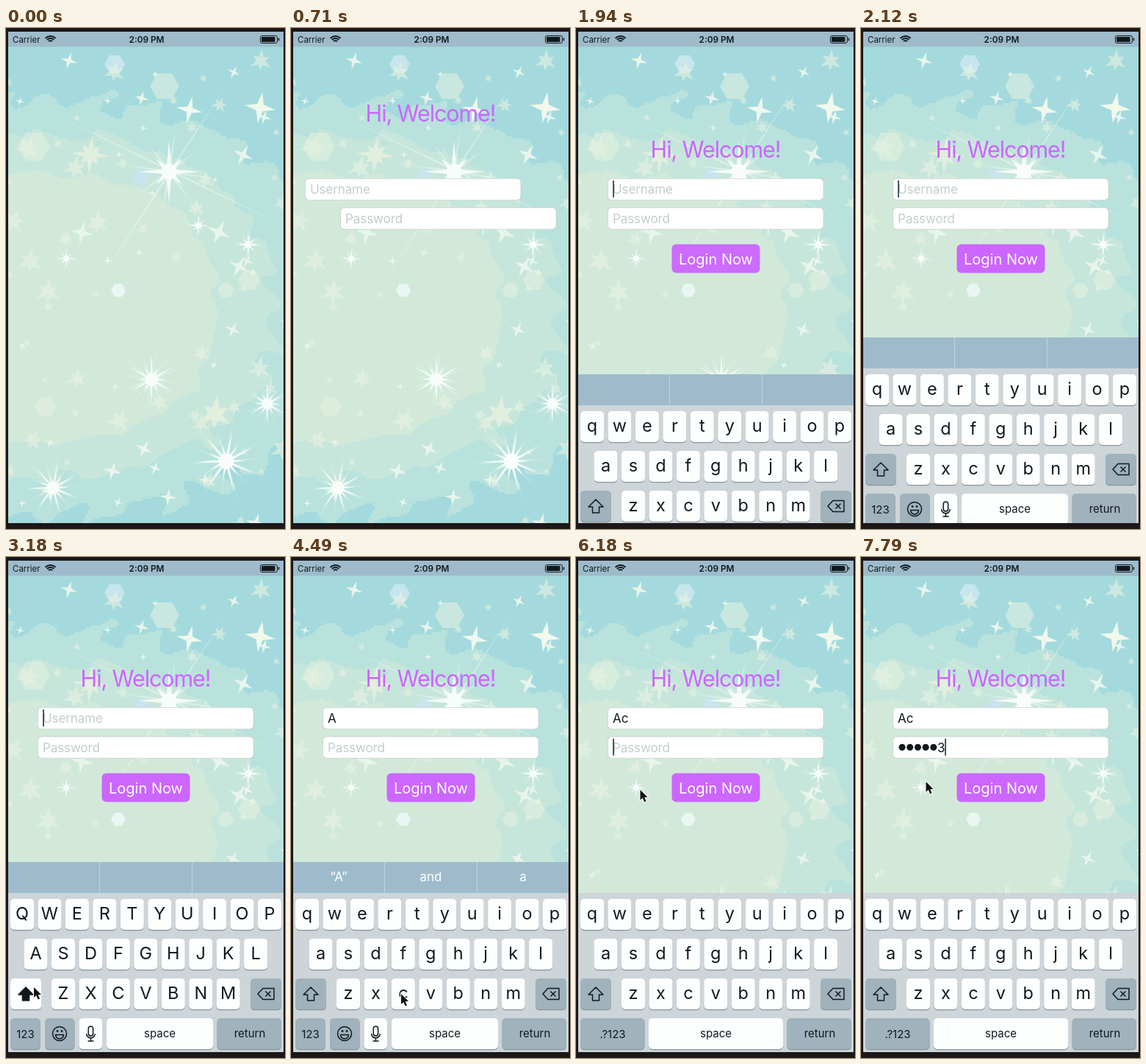
An HTML page with a canvas for the animation above (8 s loop, 380 by 680 pixels).

```html
<!DOCTYPE html>
<html lang="en">
<head>
<meta charset="utf-8">
<title>Login screen</title>
<style>
html, body { margin: 0; width: 100%; height: 100%; overflow: hidden; background: #1c1718; }
canvas { display: block; }
</style>
</head>
<body>
<canvas id="stage" width="380" height="680"></canvas>
<script>
const LOOP = 8000, PURPLE = '#cc66ff', INK = '#10191e', BAR = '#9fbbcb', WHITE = '#fdfefe', GREY = '#a0b2bb';
let c = document.getElementById('stage').getContext('2d');

const clamp = v => Math.min(1, Math.max(0, v));
const ease = v => { v = clamp(v); return v * v * (3 - 2 * v); };
const between = (t, a, b) => t >= a && t < b;

let seed = 7;
const random = () => (seed = seed * 16807 % 2147483647) / 2147483647;

function rect(x, y, w, h, color) {
  c.fillStyle = color;
  c.fillRect(x, y, w, h);
}
function box(x, y, w, h, r, color) {
  c.fillStyle = color;
  c.beginPath();
  c.roundRect(x, y, w, h, r);
  c.fill();
}
const dot = (x, y, r, color) => box(x - r, y - r, 2 * r, 2 * r, r, color);

function text(s, x, y, size, color, { align = 'left', weight = 400, spacing = 0 } = {}) {
  c.font = `${weight} ${size}px Inter, "Open Sans", sans-serif`;
  c.letterSpacing = spacing + 'px';
  c.textAlign = align;
  c.fillStyle = color;
  c.fillText(s, x, y);
  return c.measureText(s).width;
}
function path(points, close) {
  c.beginPath();
  points.forEach(([x, y]) => c.lineTo(x, y));
  if (close) c.closePath();
}
function shape(points, color) {
  c.fillStyle = color;
  path(points, true);
  c.fill();
}
function layer(width, height, paint) {
  const canvas = Object.assign(document.createElement('canvas'), { width, height });
  const outer = c;
  c = canvas.getContext('2d');
  paint();
  c = outer;
  return canvas;
}

// ---------- sparkling backdrop, painted once ----------
function spikes(x, y, r, n, inner, color, turn = 0, minor = 1) {
  shape(Array.from({ length: 2 * n }, (_, k) => {
    const angle = turn + (k / n - 0.5) * Math.PI;
    const len = k % 2 ? r * inner : k % 4 ? r * minor : r;
    return [x + len * Math.cos(angle), y + len * Math.sin(angle)];
  }), color);
}
function hexagon(x, y, r, color) {
  spikes(x, y, r, 3, 1, color, Math.PI / 6);
}

// Stepped colour bands around a rounded pale area at the left.
function paintBands() {
  const size = 3;
  for (let y = 0; y < 680; y += size)
    for (let x = 0; x < 380; x += size) {
      const d = ((x / 283) ** 2.6 + Math.abs((y - 378) / 183) ** 2.6) ** (1 / 2.6);
      const wave = Math.sin(x / 12 + 2 * Math.sin(y / 15)) + Math.sin(y / 9 + 2 * Math.sin(x / 17));
      const level = d + 0.07 * wave * clamp(d - 0.8);
      rect(x, y, size, size,
        level < 1 ? '#d2e9da' : level < 1.27 ? '#c7e6db' : level < 1.53 ? '#b9e2dd' : '#a4dadd');
    }
}
function paintSmallStars() {
  for (let row = 0; row < 13; row++)
    for (let col = 0; col < 7; col++) {
      const x = 3 + (col + random()) * 54, y = 28 + (row + random()) * 50;
      const r = 5 + 12 * random() ** 2, soft = random() < 0.6, turn = random() * 0.5;
      if (Math.hypot(x - 210, y - 395) < 70) continue;
      if (soft) spikes(x, y, r * 1.2, 6, 0.4, 'rgba(232,242,225,.6)', turn, 0.8);
      else spikes(x, y, r, 4, 0.28, '#e8f5ec', turn);
    }
}
function ray(x1, y1, x2, y2) {
  const nx = (y2 - y1) * 0.004, ny = (x1 - x2) * 0.004;
  const mx = (x1 + x2) / 2, my = (y1 + y2) / 2;
  shape([[x1, y1], [mx + nx, my + ny], [x2, y2], [mx - nx, my - ny]], 'rgba(240,250,244,.5)');
}
function paintBackdrop() {
  paintBands();
  [[38, 161, 22], [331, 342, 15], [54, 514, 15], [299, 356, 11], [216, 79, 20]]
    .forEach(([x, y, r]) => hexagon(x, y, r, 'rgba(226,240,224,.6)'));
  hexagon(148, 49, 14, '#c6e5ed');
  hexagon(183, 202, 12, '#c9e4ec');
  hexagon(153, 356, 10, '#eaf6f4');
  paintSmallStars();
  spikes(115, 172, 26, 8, 0.35, 'rgba(230,241,223,.85)', 0.1, 0.65);
  spikes(285, 524, 24, 6, 0.4, 'rgba(230,241,223,.85)', 0.1, 0.8);
  spikes(346, 108, 21, 4, 0.3, '#f1f8ec', 0.15);
  spikes(250, 111, 18, 4, 0.28, '#eff8ee', 0.2);
  ray(75, 122, 374, 266);
  ray(302, 75, 128, 342);

  [[222, 195, 42, 8], [198, 477, 34, 12], [300, 588, 42, 14], [356, 510, 28, 12],
    [64, 624, 34, 14], [82, 313, 14, 8], [330, 294, 18, 8], [262, 268, 15, 8]]
    .forEach(([x, y, r, n]) => {
      spikes(x, y, r * 1.4, n, 0.1, 'rgba(240,250,246,.4)', 0.15, 0.8);
      spikes(x, y, r, n, 0.2, '#f3fbf7', n % 4 * 0.1, 0.6);
      dot(x, y, r * 0.25, '#f8fdfb');
    });
}
const backdrop = layer(380, 680, paintBackdrop);

// ---------- form ----------
function statusBar() {
  rect(3, 5, 375, 20.5, BAR);
  text('Carrier', 9, 19.5, 11.5, INK);
  text('2:09 PM', 191.5, 19.5, 11.8, INK, { align: 'center', weight: 600 });
  c.strokeStyle = INK;
  c.lineWidth = 2;
  for (let r = 3.3; r < 10; r += 3.1) {
    c.beginPath();
    c.arc(60.5, 20.5, r, -Math.PI * 0.76, -Math.PI * 0.24);
    c.stroke();
  }
  c.lineWidth = 1;
  c.beginPath();
  c.roundRect(346.5, 10.5, 23, 10, 2.5);
  c.stroke();
  box(348, 12, 18.5, 7, 1, INK);
  box(370.7, 13.5, 1.5, 4, 1, INK);
}

const button = layer(121, 40, () => {
  box(0.5, 0.5, 120, 39, 6, PURPLE);
  text('Login Now', 60.5, 28, 20, '#fff', { align: 'center' });
});

function field(x, y, hint) {
  box(x, y, 294.5, 30, 5.5, '#c5d0cc');
  box(x + 0.8, y + 0.8, 292.9, 28.4, 5, '#fff');
  if (hint) text(hint, x + 7, y + 21, 17, '#c2cfcc', { spacing: -0.1 });
}

const USER = 'Ac', USER_KEYS = [3890, 4850];
const SECRET = 'abc123', SECRET_KEYS = [6530, 6890, 7160, 7600, 7600, 7780];
const USER_FOCUS = 1850, SECRET_FOCUS = 5900;
const pressed = (keys, t) => keys.filter(at => t >= at).length;

// The caret stays lit for a while after each edit, then blinks.
function caret(x, y, t, focus, keys) {
  const lastEdit = Math.max(focus, ...keys.filter(at => t >= at));
  if (t >= focus && (t - lastEdit) % 1000 < 600) rect(x, y + 3, 2, 23, '#40586a');
}

function form(t) {
  const drop = -142 * (1 - ease((t - 130) / 960));
  const slide = 340 * (1 - ease((t - 130) / 694));
  if (t >= 170) text('Hi, Welcome!', 190, 175.5 + drop, 30.5, PURPLE, { align: 'center', spacing: -1.1 });

  const user = USER.slice(0, pressed(USER_KEYS, t));
  field(43 - slide, 204, !user && 'Username');
  const userEnd = 50 + text(user, 50, 225, 17, INK);
  if (t < SECRET_FOCUS) caret(userEnd, 204, t, USER_FOCUS, USER_KEYS);

  const count = pressed(SECRET_KEYS, t);
  field(43 + slide, 243.5, !count && 'Password');
  let end = 50;
  if (count) {
    for (let i = 1; i < count; i++, end += 10.7) dot(end + 6, 258.3, 4.5, INK);
    end += text(SECRET[count - 1], end + 0.5, 264.5, 17, INK);
  }
  caret(end, 243.5, t, SECRET_FOCUS, SECRET_KEYS);

  c.globalAlpha = ease((t - 1060) / 1000);
  c.drawImage(button, 130, 293);
  c.globalAlpha = 1;
}

// ---------- keyboard ----------
const ROWS = [['qwertyuiop', 6, 464], ['asdfghjkl', 24.5, 518], ['zxcvbnm', 62, 572]];
const label = (s, x, y = 652) => text(s, x, y, 15, INK, { align: 'center' });

function key(x, y, w, color = WHITE) {
  box(x, y + 1.2, w, 42, 5, '#87959d');
  box(x, y, w, 42, 5, color);
}
function shiftKey(active) {
  key(6, 572, 42, active ? WHITE : GREY);
  path([[27, 584], [37, 594], [31.5, 594], [31.5, 602], [22.5, 602], [22.5, 594], [17, 594]], true);
  c.stroke();
  c.fillStyle = INK;
  if (active) c.fill();
}
function deleteKey() {
  key(333, 572, 42, GREY);
  path([[343, 593], [350, 585.5], [365, 585.5], [365, 600.5], [350, 600.5]], true);
  c.stroke();
  for (const d of [3.5, -3.5]) {
    path([[357 - d, 589.5], [357 + d, 596.5]]);
    c.stroke();
  }
}
function emojiKey() {
  key(53, 626, 40.5, GREY);
  c.beginPath();
  c.arc(73, 647, 9.5, 0, 7);
  c.stroke();
  c.beginPath();
  c.arc(73, 648.5, 5.5, 0, Math.PI);
  c.closePath();
  c.stroke();
  dot(70, 643.5, 1.4, INK);
  dot(76, 643.5, 1.4, INK);
}
function micKey() {
  key(99.5, 626, 31.5);
  c.beginPath();
  c.roundRect(112.2, 637, 6.4, 13, 3.2);
  c.stroke();
  c.beginPath();
  c.arc(115.4, 647, 5.8, 0, Math.PI);
  c.moveTo(115.4, 653);
  c.lineTo(115.4, 657);
  c.moveTo(111.5, 657);
  c.lineTo(119.5, 657);
  c.stroke();
}
function popup(letter, x, y) {
  box(x - 30, y - 64, 60, 54, 10, '#b4c0c6');
  box(x - 29, y - 63, 58, 52, 9, WHITE);
  shape([[x - 27, y - 13], [x + 27, y - 13], [x + 16, y], [x + 16, y + 42], [x - 16, y + 42], [x - 16, y]], WHITE);
  text(letter, x, y - 25, 34, INK, { align: 'center', weight: 300 });
}
function suggestions(user) {
  rect(3, 414, 375, 42, BAR);
  rect(127, 414, 1, 42, '#c3d4dd');
  rect(253, 414, 1, 42, '#c3d4dd');
  const words = [[], ['“A”', 'and', 'a'], ['“Ac”', 'Account', 'Accounting']][user];
  words.forEach((word, i) => text(word, 65 + i * 125.5, 439.5, 17, '#fff', { align: 'center' }));
}

function keyboard(t) {
  if (t < 1820) return;
  const upper = between(t, 3180, 3890), secure = t >= SECRET_FOCUS;
  c.save();
  c.translate(0, Math.round(258 * Math.exp(-(t - 1820) * 0.0126)));
  rect(3, 456, 375, 216, '#cdd5d9');
  if (!secure) suggestions(pressed(USER_KEYS, t));

  for (const [letters, x, y] of ROWS)
    [...letters].forEach((letter, i) => {
      const left = x + i * 37.45;
      key(left, y, 32);
      text(upper ? letter.toUpperCase() : letter, left + 16, y + 28, 23.5, INK, { align: 'center' });
    });

  c.strokeStyle = INK;
  c.lineWidth = 1.5;
  c.lineJoin = 'round';
  shiftKey(upper);
  deleteKey();
  key(6, 626, secure ? 87.5 : 41, GREY);
  label(secure ? '.?123' : '123', secure ? 50 : 26.5, 653);
  if (!secure) {
    emojiKey();
    micKey();
  }
  const spaceLeft = secure ? 99 : 137;
  key(spaceLeft, 626, 282 - spaceLeft);
  label('space', (spaceLeft + 282) / 2);
  key(287.5, 626, 87.5, GREY);
  label('return', 332);
  if (between(t, 3710, 3890)) popup('A', 40.5, 518);
  if (between(t, 4760, 4850)) popup('c', 153, 572);
  c.restore();
}

// ---------- mouse pointer: [start, duration, x, y] of each move ----------
const MOVES = [[2640, 240, 38, 584], [3200, 300, 40, 541], [3900, 550, 150, 593],
  [4940, 860, 94, 256], [5950, 210, 87.5, 316], [6270, 180, 88.5, 305]];

function pointer(t) {
  if (t < MOVES[0][0]) return;
  let x = 6, y = 560;
  for (const [start, duration, toX, toY] of MOVES) {
    const k = ease((t - start) / duration);
    x += (toX - x) * k;
    y += (toY - y) * k;
  }
  c.save();
  c.translate(x, y);
  path([[0, 0], [0, 14], [3.2, 11], [5.6, 16.5], [8, 15.5], [5.7, 10.2], [10, 10]], true);
  c.lineWidth = 2;
  c.strokeStyle = '#fff';
  c.stroke();
  c.fillStyle = '#111';
  c.fill();
  c.restore();
}

function draw(t) {
  rect(0, 0, 380, 680, '#1c1718');
  c.save();
  c.beginPath();
  c.rect(3, 5, 375, 667);
  c.clip();
  c.drawImage(backdrop, 0, 0);
  statusBar();
  form(t);
  keyboard(t);
  pointer(t);
  c.restore();
}

const start = performance.now();
(function tick() {
  draw((performance.now() - start) % LOOP);
  requestAnimationFrame(tick);
})();
</script>
</body>
</html>
```
